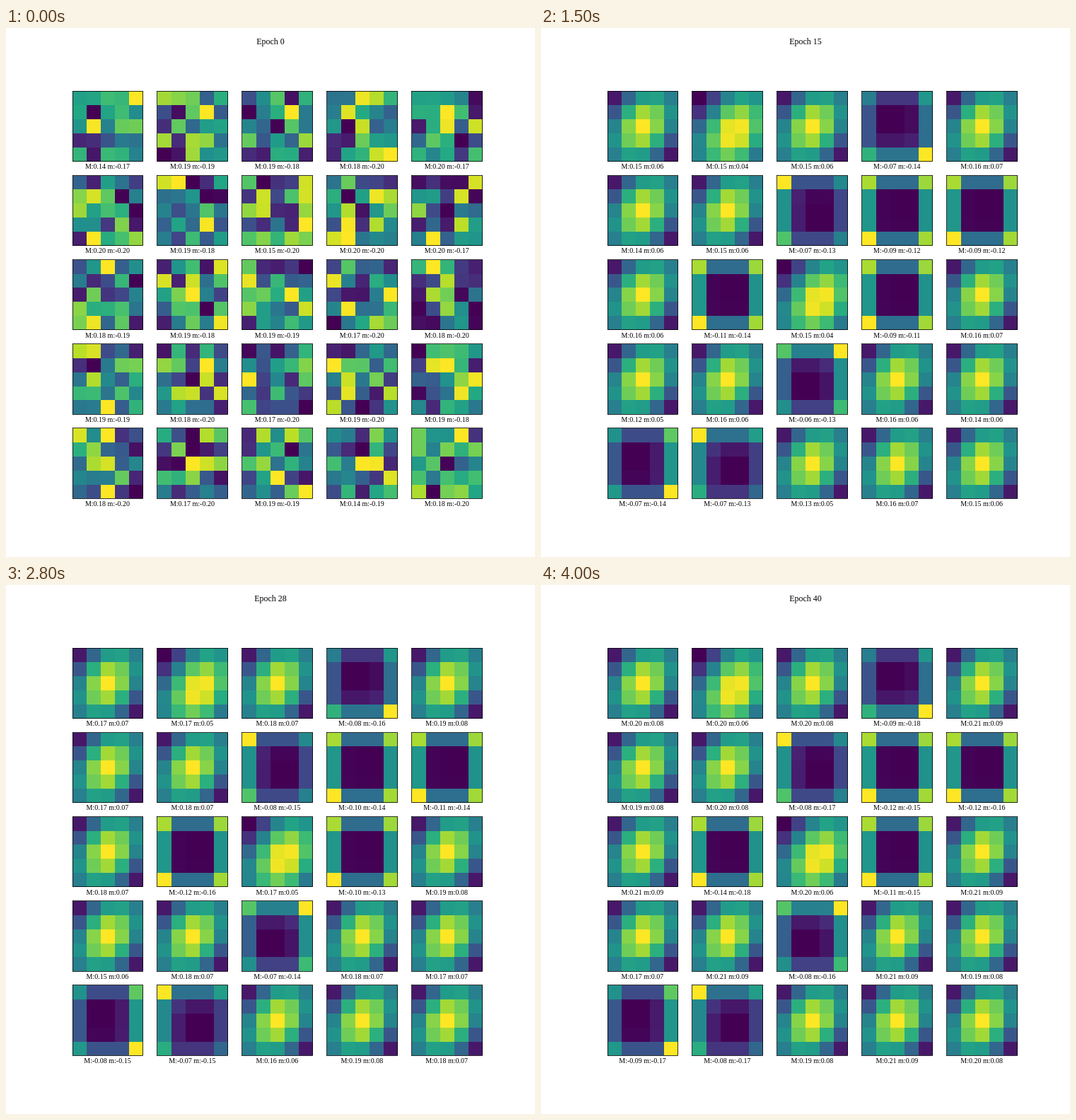
Write an HTML page that moves like this. It is 748 px wide and 748 px high and loops after 4100 ms.

```html
<!DOCTYPE html>
<html lang="en">
<head>
<meta charset="utf-8">
<title>Filter weights by epoch</title>
<style>
  html, body { margin: 0; width: 100%; height: 100%; overflow: hidden; background: #fff; }
  svg { display: block; width: 748px; height: 748px; }
  text { font-family: "Liberation Serif", "Times New Roman", serif; text-anchor: middle; fill: #000; }
</style>
</head>
<body>
<svg id="stage" viewBox="0 0 748 748" xmlns="http://www.w3.org/2000/svg"></svg>
<script>
const NS = 'http://www.w3.org/2000/svg';
const N = 5, SIZE = 748, EPOCHS = 41, STEP = 100;
const LEFT = 93.5, TOP = 89.76, W = 99.95, H = 99.3, DX = 119.94, DY = 119.16;

const VIRIDIS = ['440154', '482475', '414487', '355f8d', '2a788e', '21918c',
  '22a884', '44bf70', '7ad151', 'bddf26', 'fde725'].map(h =>
  [0, 2, 4].map(i => parseInt(h.slice(i, i + 2), 16)));

// Build a 5 by 5 filter from a rule of the offsets from its centre
const grid = rule => Array.from({ length: N * N }, (_, i) => rule(i % N - 2, Math.floor(i / N) - 2));

// Bright bell, stretched along one diagonal, with its top moved by d
const blob = d => grid((u, w) => {
  const bell = Math.exp(-(.2 - .06 * d) * (u - d) ** 2 - (.15 - .05 * d) * (w - d) ** 2);
  const skew = u * w * (.085 - .005 * (u * u + w * w));
  return bell * (1 + .1 * d) - skew;
});

// Dark centre; each side has its brightness and spills inwards if it beats the opposite side
function hollow(left, top, right, bottom) {
  const best = Math.max(left, right) + Math.max(top, bottom);
  const along = (k, near, far) => {
    const [side, other] = k < 0 ? [near, far] : [far, near];
    if (Math.abs(k) === 2) return side;
    return k ? .28 * Math.max(0, side - other) : 0;
  };
  return grid((u, w) => {
    const edgeX = Math.abs(u) === 2, edgeY = Math.abs(w) === 2;
    const x = along(u, left, right), y = along(w, top, bottom);
    if (edgeX && edgeY) return x + y === best ? 1 : x + y;
    return edgeX ? x : edgeY ? y : x + y;
  });
}

const BLOB = { cells: blob(0), ratio: .405 };
const LOW = { cells: blob(.57), ratio: .3 };
const FRAME = { cells: hollow(.52, .35, .5, .36), ratio: .76 };
const sided = (...sides) => ({ cells: hollow(...sides), ratio: .5 });
const KINDS = {
  1: LOW, 12: LOW,
  3: sided(.26, .16, .36, .38),
  7: sided(.5, .26, .21, .22),
  8: FRAME, 9: FRAME, 11: FRAME, 13: FRAME,
  17: sided(.3, .43, .49, .19),
  20: sided(.27, .23, .52, .26),
  21: sided(.47, .37, .18, .15)
};

// Strongest weight of each panel after one epoch, in thousandths
const PEAKS = [
  139, 139, 142, -136, 152,
  132, 142, -127, -112, -117,
  148, -136, 140, -106, 152,
  113, 148, -119, 148, 132,
  -129, -126, 124, 152, 142];

function seeded(s) {
  return () => {
    s = s + 0x6D2B79F5 | 0;
    let t = Math.imul(s ^ s >>> 15, 1 | s);
    t = t + Math.imul(t ^ t >>> 7, 61 | t) ^ t;
    return ((t ^ t >>> 14) >>> 0) / 4294967296;
  };
}
const rand = seeded(11);

const panels = PEAKS.map((peak, p) => {
  const noise = grid(() => rand() * .4 - .2);
  const hi = Math.max(...noise), lo = Math.min(...noise);
  return {
    ...(KINDS[p] || BLOB), peak, hi, lo,
    noise: noise.map(v => (v - lo) / (hi - lo))
  };
});

const growth = e => Math.max(0, (e - 8) / 32) ** 1.25;

function extremes({ peak, ratio, hi, lo }, e) {
  if (e === 0) return [hi, lo];
  const top = (peak + (peak > 0 ? 62 : -42) * growth(e)) / 1000;
  return [Math.max(top, top * ratio), Math.min(top, top * ratio)];
}

function colour(v) {
  const f = 10 * Math.min(1, Math.max(0, v));
  const i = Math.min(9, Math.floor(f));
  const c = VIRIDIS[i].map((a, k) => Math.round(a + (VIRIDIS[i + 1][k] - a) * (f - i)));
  return `rgb(${c})`;
}

const stage = document.getElementById('stage');
function add(tag, attrs) {
  const el = document.createElementNS(NS, tag);
  for (const k in attrs) el.setAttribute(k, attrs[k]);
  return stage.appendChild(el);
}

// Pixel rounding of cell edges and of frame lines
const cellX = v => Math.round(v + .3);
const cellY = v => Math.round(v - .3);
const lineX = v => Math.round(v) + .5;
const lineY = v => SIZE - Math.round(SIZE - v) - .5;

function box(x0, y0, x1, y1, attrs) {
  return add('rect', { x: x0, y: y0, width: x1 - x0, height: y1 - y0, ...attrs });
}

const title = add('text', { x: SIZE / 2, y: 23, 'font-size': 12 });
const views = panels.map((_, p) => {
  const x = LEFT + p % N * DX, y = TOP + Math.floor(p / N) * DY;
  const cells = grid((u, w) => {
    const cx = x + (u + 2) * W / N, cy = y + (w + 2) * H / N;
    return box(cellX(cx), cellY(cy), cellX(cx + W / N), cellY(cy + H / N),
      { 'shape-rendering': 'crispEdges' });
  });
  box(lineX(x), lineY(y), lineX(x + W), lineY(y + H),
    { fill: 'none', stroke: '#000', 'stroke-width': .8 });
  const label = add('text', { x: x + W / 2, y: y + H + 10.2, 'font-size': 10 });
  return { cells, label };
});

let shown = -1;
function draw(e) {
  if (e === shown) return;
  shown = e;
  title.textContent = `Epoch ${e}`;
  views.forEach(({ cells, label }, p) => {
    const panel = panels[p];
    const values = e === 0 ? panel.noise : panel.cells;
    cells.forEach((c, i) => c.setAttribute('fill', colour(values[i])));
    const [hi, lo] = extremes(panel, e);
    label.textContent = `M:${hi.toFixed(2)} m:${lo.toFixed(2)}`;
  });
}

const start = performance.now();
function tick() {
  const t = Math.max(0, performance.now() - start);
  draw(Math.floor(t / STEP) % EPOCHS);
  requestAnimationFrame(tick);
}
draw(0);
requestAnimationFrame(tick);
</script>
</body>
</html>
```
